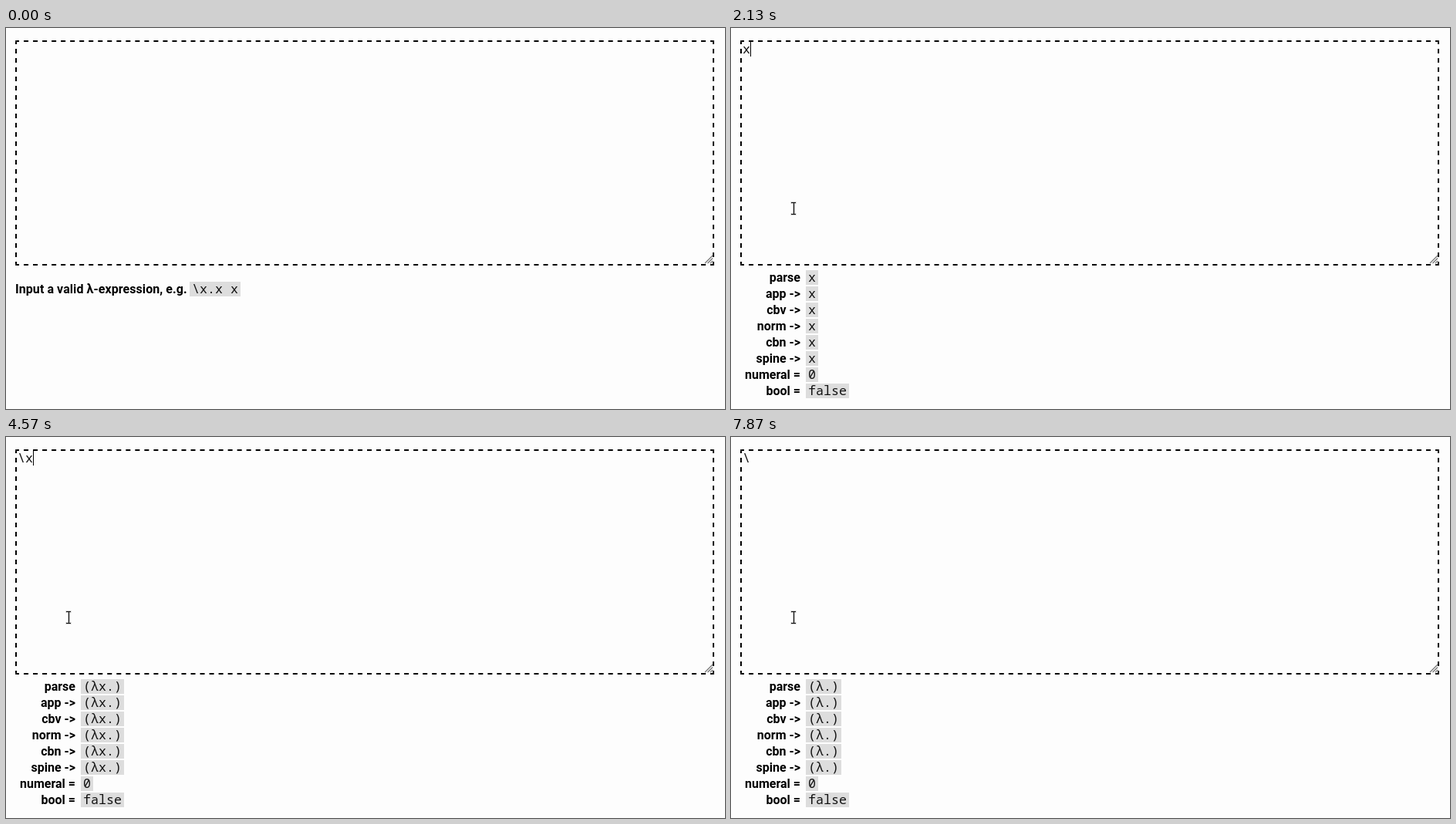
Write an HTML page that moves like this. It is 932 by 494 pixels and loops after 8000 ms.

```html
<!DOCTYPE html>
<html lang="en">
<head>
<meta charset="utf-8">
<title>Lambda evaluator</title>
<style>
  html, body { margin: 0; width: 100%; height: 100%; overflow: hidden; background: #fdfdfd; }
  svg { display: block; width: 932px; height: 494px; }
  text { white-space: pre; }
  .label { font: bold 16px Roboto, sans-serif; }
  .end { text-anchor: end; }
  .hint { letter-spacing: .07px; }
  .code { font: 16.667px "Noto Sans Mono", monospace; fill: #111; }
  .chip { fill: #ddd; }
  .dash { stroke: #000; stroke-width: 2; }
</style>
</head>
<body>
<svg id="stage" viewBox="0 0 932 494" xmlns="http://www.w3.org/2000/svg">
  <g id="frame"></g>
  <path d="M906 305L916 295M909.500 305L916 298.500M913 305L916 302" stroke="#777" stroke-width="1.300" fill="none"/>
  <g id="hint"><text class="label hint" x="12" y="344">Input a valid λ-expression, e.g.</text></g>
  <g id="results"></g>
  <text id="input" class="code" x="15" y="33"></text>
  <rect id="caret" y="17" width="1" height="20"/>
  <g id="pointer" fill="none">
    <path d="M77.500 226.500H84.500M81.500 226V242M77.500 241.500H84.500" stroke="#ccc" stroke-width="3"/>
    <path d="M78 226.500H84M81.500 227V241M78 241.500H84" stroke="#111"/>
  </g>
</svg>
<script>
const LOOP = 8000, CHAR = 10;
const $ = id => document.getElementById(id);

function add(parent, tag, attrs, text = '') {
  const el = document.createElementNS('http://www.w3.org/2000/svg', tag);
  for (const key in attrs) el.setAttribute(key, attrs[key]);
  el.textContent = text;
  parent.appendChild(el);
  return el;
}

// Code text on a tinted background
function chip(parent, x, y) {
  const box = add(parent, 'rect', { class: 'chip', x, y, height: 19 });
  const label = add(parent, 'text', { class: 'code', x: x + 3, y: y + 15 });
  return value => {
    box.setAttribute('width', value.length * CHAR + 6);
    label.textContent = value;
  };
}

// Dashed side that begins and ends with half a dash
function side(x1, y1, x2, y2) {
  const length = x2 - x1 + y2 - y1;
  const dash = length / Math.round(length / 12) / 2;
  add($('frame'), 'line', {
    class: 'dash', x1, y1, x2, y2,
    'stroke-dasharray': dash, 'stroke-dashoffset': dash / 2
  });
}

for (const y of [17, 307]) side(14, y, 916, y);
for (const x of [13, 917]) side(x, 18, x, 306);
for (const x of [12, 916])
  for (const y of [16, 306]) add($('frame'), 'rect', { x, y, width: 2, height: 2, rx: .7 });

chip($('hint'), 238, 329)('\\x.x x');

const rows = ['parse', 'app ->', 'cbv ->', 'norm ->', 'cbn ->', 'spine ->', 'numeral =', 'bool =']
  .map((name, i) => {
    const y = 314 + i * 21;
    add($('results'), 'text', { class: 'label end', x: 90, y: y + 15 }, name);
    return chip($('results'), 97, y);
  });

// Time of each key press and the input after it
const keys = [
  [0, ''], [1530, 'x'], [2700, ''], [3500, '\\'], [4570, '\\x'], [4970, '\\x.'],
  [5530, '\\x.x'], [6430, '\\x.'], [7000, '\\x'], [7500, '\\']
];

function parse(input) {
  if (input[0] !== '\\') return input;
  const [arg, body = ''] = input.slice(1).split('.');
  return `(λ${arg}.${body})`;
}

function show(el, on) {
  el.setAttribute('visibility', on ? 'visible' : 'hidden');
}

let shown = null;
function render(t) {
  const input = keys.filter(([start]) => start <= t).pop()[1];
  if (input !== shown) {
    shown = input;
    const term = parse(input);
    rows.forEach((set, i) => set(i < 6 ? term : i === 6 ? '0' : 'false'));
    $('input').textContent = input;
    $('caret').setAttribute('x', 15 + input.length * CHAR);
    show($('hint'), !input);
    show($('results'), input);
  }
  show($('pointer'), t >= 30);
  show($('caret'), t >= 30 && t < 7700);
}

let origin;
function tick(now) {
  origin ??= now;
  render((now - origin) % LOOP);
  requestAnimationFrame(tick);
}
render(0);
requestAnimationFrame(tick);
</script>
</body>
</html>
```
